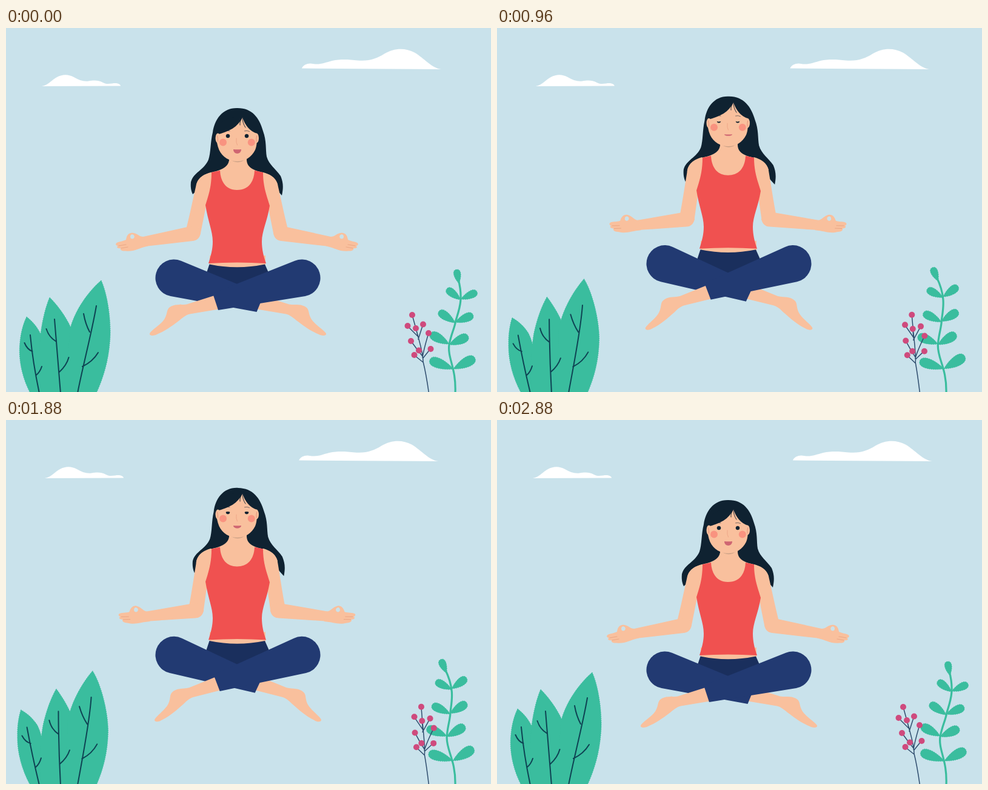
An HTML page that plays this animation: 800 by 600 pixels, repeating every 2920 ms.

```html
<!DOCTYPE html>
<html lang="en">
<head>
<meta charset="utf-8">
<title>Floating meditation</title>
<style>
  html, body { margin: 0; width: 100%; height: 100%; overflow: hidden; background: #c9e2eb; }
  svg { display: block; width: 100%; height: 100%; }
  .skin { fill: #f9c09d; }
  .hair { fill: #0f2231; }
  .pants { fill: #223a72; }
  .leaf { fill: #3abd9e; stroke: #3abd9e; stroke-width: .9; stroke-dasharray: 1.5 2; }
  .vein { fill: none; stroke: #0e4353; stroke-width: 2; stroke-linecap: round; }
  .stem { fill: none; stroke: #3abd9e; stroke-width: 3.2; stroke-linecap: round; }
  .twig { fill: none; stroke: #2f4d6e; stroke-width: 1.5; stroke-linecap: round; }
  .berry { fill: #cf4a7d; }
  .thin { fill: none; stroke-linecap: round; stroke-width: .9; }
</style>
</head>
<body>
<svg viewBox="0 0 800 600" preserveAspectRatio="xMidYMid meet">
  <defs>
    <g id="arm" class="upperArm skin">
      <path d="M339,238C326,241 315,247 313,262C308,284 303,308 298,328L302,349C312,352 319,349 321,338L331,288L345,250Z"/>
      <g class="forearm">
        <path d="M299,328L224,344.500L229,360L308,351C316,350 319,345 321,338L316,326Z"/>
        <g class="hand">
          <path fill-rule="evenodd" d="M228,344C220,345 217,338 208,337.500C201,338 199,343 198,349C192,352 185,352 182,354.500C180,357 182,359 185,359C181,361 184,364 189,363C188,366 191,368 197,367.500C212,369 218,363 234,359.500ZM208,340.300C213,340.300 213,347.600 208,347.600C204,347.600 204,340.300 208,340.300Z"/>
          <path class="thin" stroke="#e8a584" d="M186,359L198,357M190,363L201,361"/>
        </g>
      </g>
    </g>
  </defs>

  <rect width="800" height="600" fill="#c9e2eb"/>
  <path id="cloudLeft" fill="#fff" d="M59,96C70,94 76,85 84,81C94,76 102,76 112,81C120,86 128,88.500 136,87.500C146,86 152,86 160,90C166,93 170,92 175,91.500C182,90 189,92 189,95.500Z"/>
  <path id="cloudRight" fill="#fff" d="M488,66.500C490,60 500,57 506,59C518,61 526,57 538,54C552,51 566,52 580,53.500C600,55 612,50 624,42.500C640,33 658,32 674,40.500C690,50 702,66 718,68Z"/>

  <g id="plants"></g>

  <path id="hair" class="hair" d="M382,132C358,131 344,150 341,172C337,188 338,205 334,217C327,234 309,238 305,254C304,264 306,270 308,274L330,255L436,255L455,276C458,262 457,254 453,244C445,232 434,226 430,212C428,200 430,186 424,170C418,148 406,132 382,132Z"/>

  <g id="torso">
    <g id="arms"></g>
    <path class="skin" d="M368,200V218C366,231 352,235 338,238C326,241 317,247 314,258L335,290H428L448,258C445,247 436,241 424,238C410,235 398,231 397,218V200Z"/>
    <path class="skin" d="M336,375H428V392Q381,400 336,392Z"/>
  </g>

  <g id="head">
    <path fill="#cba186" d="M368,210C370,225 394,225 397,210Z"/>
    <path class="hair" d="M344,180C344,162 356,146 390,146C408,150 418,162 419,178Z"/>
    <ellipse class="skin" cx="349.500" cy="181.500" rx="4" ry="8"/>
    <ellipse class="skin" cx="413" cy="181.500" rx="4" ry="8"/>
    <path class="skin" d="M347,176C368,171 383,163 390,147C394,160 402,170 414,174C414,186 414,194 411,201C405,213 394,219.800 381.500,219.800C369,219.800 357,213 351.500,201C348.500,194 347,186 347,176Z"/>
    <path class="thin" stroke="#0f2231" d="M390,147Q385,154 386,160M390,147Q390,157 395,164"/>
    <path class="thin" stroke="#0f2231" opacity=".6" d="M361.500,170.500Q365,168.500 369,169.700M393.500,169.700Q398,168.500 401.500,170.500"/>
    <path class="thin" stroke="#eda486" d="M380,182Q379,189 381.500,193"/>
    <path class="thin" stroke="#e58a74" d="M348.500,178Q350,182 349.500,187M413.500,178Q412.500,182 413,187"/>
    <g fill="#f99380"><circle cx="358" cy="188.500" r="6"/><circle cx="404.800" cy="188.500" r="6"/></g>
    <path id="eyeLeft" class="hair" transform="translate(366 178)"/>
    <path id="eyeRight" class="hair" transform="translate(397 178)"/>
    <path id="mouth" fill="#cf6672"/>
  </g>

  <path id="waist" fill="#1a2f5d" d="M335.500,389.500Q381,399 427,389.500L433,403L436,412L412,440H352L328,412L331,403Z"/>
  <g id="legs"></g>

  <path id="shirt" fill="#f05150" d="M339,238L353,235C354,256 365,267 381,267C398,267 409,256 410,235L424,238C424,262 430,276 435,293C431,318 422,335 422,352C422,365 425,377 429,388Q381,385 334,388C338,375 341,365 341,352C341,335 333,318 329,292C334,276 339,262 339,238Z"/>
</svg>

<script>
const NS = 'http://www.w3.org/2000/svg';
const $ = id => document.getElementById(id);
const set = (el, name, value) => el.setAttribute(name, value);
const move = (id, x, y) => set($(id), 'transform', `translate(${x} ${y})`);

function add(parent, tag, attrs = {}) {
  const el = document.createElementNS(NS, tag);
  for (const name in attrs) set(el, name, attrs[name]);
  return parent.appendChild(el);
}
const flipped = (parent, width) =>
  add(parent, 'g', { transform: `translate(${width} 0) scale(-1 1)` });

for (const side of [add($('arms'), 'g'), flipped($('arms'), 762)]) {
  side.appendChild($('arm').cloneNode(true)).removeAttribute('id');
}

// The left foot hangs from the right thigh and the other way round.
const foot = 'M350,439L298,455.500C286,457 278,454 269,461C264,466 267,473 259,483C251,492 240,498 237,503.500C236,507 242,508.500 249,505C264,499 275,490 286,482C293,476 298,472 306,471L354,463Z';
const thigh = hem => `M288.600,383.800L${hem}L271.500,442A30.500,30.500 0 1 1 288.600,383.800Z`;
function addFoot(side) {
  add(add(add(side, 'g', { class: 'lower' }), 'g', { class: 'shin' }), 'path', { class: 'skin', d: foot });
}
function addThigh(side, hem) {
  add(side, 'path', { class: 'thigh pants', d: thigh(hem) });
}
addFoot(flipped($('legs'), 765));
addThigh(add($('legs'), 'g'), '425,440L413.500,468');
addFoot(add($('legs'), 'g'));
addThigh(flipped($('legs'), 765), '424,437.500L415,465');

// Plants: every point sways with the square of its height above the ground.
const bent = [];
function plant(sway, axis, shapes) {
  for (const [cls, d] of shapes) {
    bent.push({ el: add($('plants'), 'path', { class: cls }), d, sway, axis });
  }
}
function bendPoint(x, y, sway, axis) {
  const h = Math.max(0, 600 - y);
  return [x + sway * h * h, y + 2 * sway * h * (x - axis)];
}
function bendPath(d, sway, axis) {
  return d.replace(/(-?[\d.]+),(-?[\d.]+)/g, (_, x, y) =>
    bendPoint(+x, +y, sway, axis).map(v => v.toFixed(2)).join());
}
function blade(bx, by, tx, ty, w) {
  const dx = tx - bx, dy = ty - by, len = Math.hypot(dx, dy);
  const nx = -dy / len * w, ny = dx / len * w;
  const mx = bx + dx * .4, my = by + dy * .4;
  return `M${bx},${by}C${mx + nx * .7},${my + ny * .7} ${tx + nx},${ty + ny} ${tx},${ty}` +
    `C${tx - nx},${ty - ny} ${mx - nx * .7},${my - ny * .7} ${bx},${by}Z`;
}

plant(-.00078, 45, [
  ['leaf', 'M34,476C44,484 51,492 57,504C66,525 68,570 66,602L40,602C26,575 20,545 23,518C24,505 28,488 34,476Z']]);
plant(.00057, 78, [
  ['leaf', 'M72,444C84,456 98,474 107,494C116,520 120,560 115,602L58,602C53,570 54,535 57,505C60,480 66,458 72,444Z']]);
plant(-.00053, 140, [
  ['leaf', 'M157,416C168,440 174,485 171.500,515C169,550 160,578 149,602L90,602C100,570 104,520 106,495C114,465 135,435 157,416Z'],
  ['vein', 'M149,458C142,500 126,560 118,602M128,471Q131,488 138,501M152,535Q143,550 126,558']]);
plant(-.00078, 45, [
  ['vein', 'M40,506Q44,550 55,602M30.500,519Q35,530 43.500,533M59,558Q56,567 50,572']]);
plant(.00057, 78, [
  ['vein', 'M80,480Q85,540 90,602M66.500,496Q71,510 83,517M103.500,543Q100,556 88,567']]);

plant(-.00081, 730, [
  ['stem', 'M741,602C743,560 728,545 731,522C734,505 740,495 742,482C747,465 755,448 746,414'],
  ...[
    [747, 421, 743, 398, 9],
    [750, 448, 727, 430, 10], [750, 447, 777, 435, 10],
    [741, 486, 714, 467, 11], [741, 485, 770.5, 473, 11],
    [731, 521, 700, 504, 12], [731, 522, 762.5, 508, 12],
    [738, 562, 699, 547, 13], [738, 562, 773.5, 544, 13]
  ].map(p => ['leaf', blade(...p)])]);

const berrySway = .00118, berryAxis = 671;
plant(berrySway, berryAxis, [
  ['twig', 'M697.500,602Q693,570 688,550C688,535 680,510 670,473M688,551L673,539M688,544L700,529M687,543Q689,530 697,503M687,541Q678,530 668,516M680,513L688,488M679,508L662,491M680,510L676,495']]);
const berries = [[670, 473], [662.5, 491], [676, 495], [688, 488.5], [697, 503], [668, 516], [681, 531.5], [700.5, 529], [673.5, 539]]
  .map(at => ({ at, el: add($('plants'), 'circle', { class: 'berry', r: 5 }) }));

const smooth = x => { x = Math.min(1, Math.max(0, x)); return x * x * (3 - 2 * x); };
const mouthKeys = [[0, 7], [320, 6], [680, 4], [1240, 1.2], [1500, 1.2], [1880, 4.5], [2200, 6.5], [2920, 7]];
function track(keys, t) {
  const i = keys.findIndex(k => k[0] > t);
  const [t0, v0] = keys[i - 1], [t1, v1] = keys[i];
  return v0 + (v1 - v0) * (t - t0) / (t1 - t0);
}
function turn(cls, angle, x, y, dx = 0, dy = 0) {
  document.querySelectorAll(cls).forEach(el =>
    set(el, 'transform', `translate(${dx} ${dy}) rotate(${angle} ${x} ${y})`));
}

function draw(t) {
  const lift = (1 - Math.cos(2 * Math.PI * t / 2880)) / 2;

  move('cloudLeft', 6.3 * lift, 0);
  move('cloudRight', -6 * lift, 0);
  for (const p of bent) set(p.el, 'd', bendPath(p.d, p.sway * lift, p.axis));
  for (const b of berries) {
    const [x, y] = bendPoint(...b.at, berrySway * lift, berryAxis);
    set(b.el, 'cx', x);
    set(b.el, 'cy', y);
  }

  for (const id of ['torso', 'waist', 'shirt']) move(id, 0, -32.3 * lift);
  move('head', 0, -33 * lift);
  const tilt = .022 * lift, skew = .02 * lift;
  set($('hair'), 'transform',
    `matrix(1 ${tilt} ${skew} 1 ${1.3 * lift - 132 * skew} ${-25.5 * lift - 382 * tilt})`);

  turn('.upperArm', -4.4 * lift, 325, 255);
  turn('.forearm', 7.8 * lift, 308, 340);
  turn('.hand', 7.5 * lift, 228, 352);

  turn('.thigh', 3.5 * lift, 277, 412, 0, -31.3 * lift);
  turn('.lower', -3.5 * lift, 488, 412, 0, -31.3 * lift);
  turn('.shin', -2.3 * lift, 345, 453, 2 * lift);

  const closed = smooth((t - 80) / 480) - smooth((t - 1640) / 480);
  const lid = -4.4 + 6 * closed;
  const eye = `M-3.300,0C-3.300,4.400 3.300,4.400 3.300,0C3.300,${lid} -3.300,${lid} -3.300,0Z`;
  set($('eyeLeft'), 'd', eye);
  set($('eyeRight'), 'd', eye);
  const m = 200 + track(mouthKeys, t) * 1.33;
  set($('mouth'), 'd', `M375,200Q381.500,200.600 388,200C388,${m} 375,${m} 375,200Z`);
}

const start = performance.now();
function tick() {
  const t = Math.max(0, performance.now() - start) % 2920;
  draw(Math.floor(t / 40) * 40);
  requestAnimationFrame(tick);
}
draw(0);
requestAnimationFrame(tick);
</script>
</body>
</html>
```
